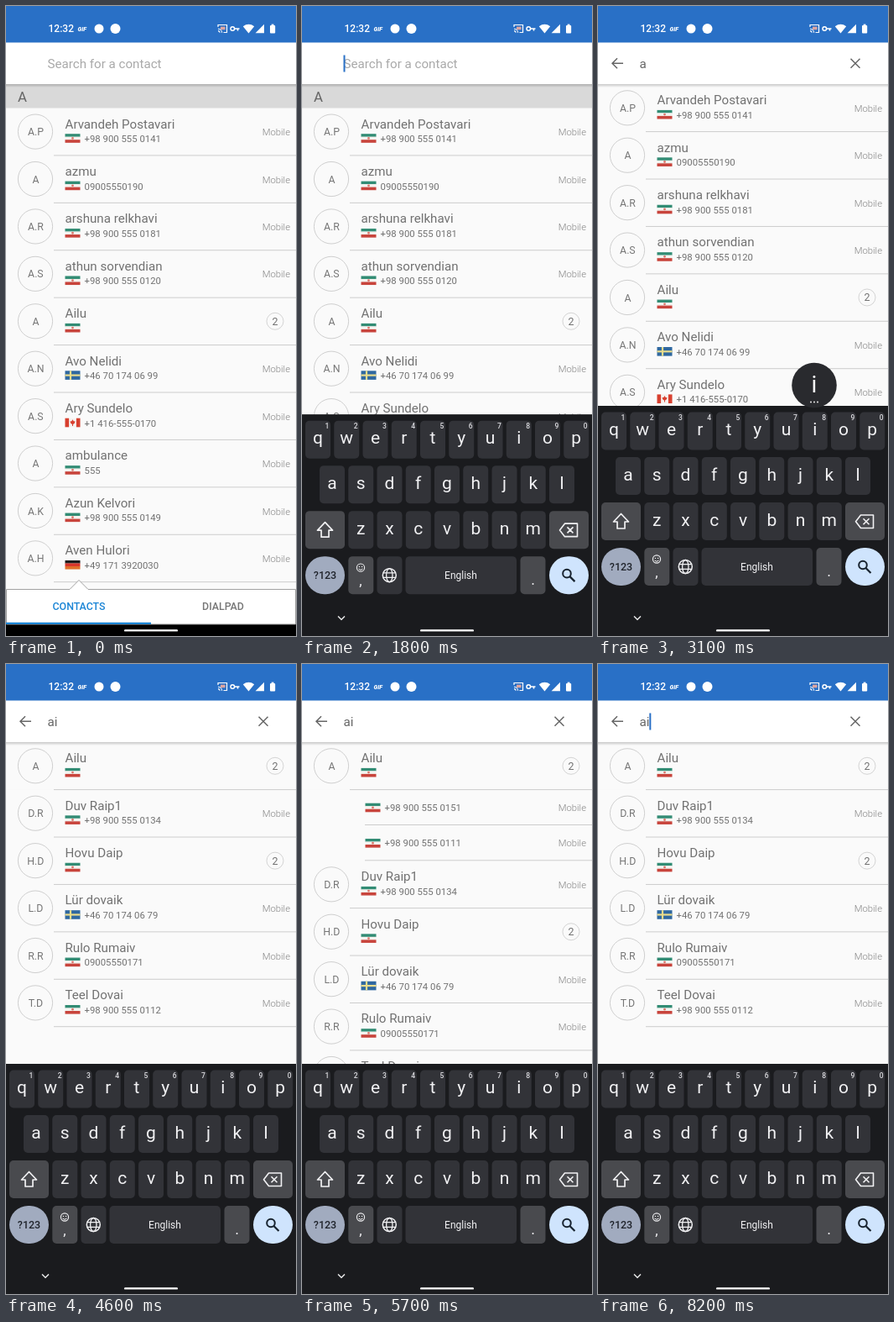
Recreate the animation shown at these times as an HTML page. Size 346 by 750 pixels, loop 8.6 s.

```html
<!DOCTYPE html>
<html lang="en">
<head>
<meta charset="utf-8">
<title>Contact search</title>
<style>
html, body { margin: 0; width: 100%; height: 100%; overflow: hidden; background: #fafafa; }
svg { display: block; font-family: Roboto, sans-serif; }
text { white-space: pre; }
</style>
</head>
<body>
<svg id="stage" width="346" height="750" viewBox="0 0 346 750"></svg>
<script>
const LOOP = 8600, STEP = 100, PITCH = 56.42, SUB = 42.3;
const GREY = '#717171', LINE = '#cdcdcd', PAGE = '#fafafa', BLUE = '#2970c6';

const contacts = [
  ['Arvandeh Postavari', 'A.P', 'ir', '+98 900 555 0141'],
  ['azmu', 'A', 'ir', '09005550190'],
  ['arshuna relkhavi', 'A.R', 'ir', '+98 900 555 0181'],
  ['athun sorvendian', 'A.S', 'ir', '+98 900 555 0120'],
  ['Ailu', 'A', 'ir', ''],
  ['Avo Nelidi', 'A.N', 'se', '+46 70 174 06 99'],
  ['Ary Sundelo', 'A.S', 'ca', '+1 416-555-0170'],
  ['ambulance', 'A', 'ir', '555'],
  ['Azun Kelvori', 'A.K', 'ir', '+98 900 555 0149'],
  ['Aven Hulori', 'A.H', 'de', '+49 171 3920030']
];
const matches = [
  ['Duv Raip1', 'D.R', 'ir', '+98 900 555 0134'],
  ['Hovu Daip', 'H.D', 'ir', ''],
  ['Lür dovaik', 'L.D', 'se', '+46 70 174 06 79'],
  ['Rulo Rumaiv', 'R.R', 'ir', '09005550171'],
  ['Teel Dovai', 'T.D', 'ir', '+98 900 555 0112']
];
const extraNumbers = ['+98 900 555 0151', '+98 900 555 0111'];

const rect = (x, y, w, h, fill, more = '') =>
  `<rect x="${x}" y="${y}" width="${w}" height="${h}" fill="${fill}" ${more}/>`;
const text = (x, y, s, size, fill, more = '') =>
  `<text x="${x}" y="${y}" font-size="${size}" fill="${fill}" ${more}>${s}</text>`;
const mid = (x, y, s, size, fill, more = '') => text(x, y, s, size, fill, 'text-anchor="middle" ' + more);
const ring = (x, y, r, stroke, more = '') =>
  `<circle cx="${x}" cy="${y}" r="${r}" fill="none" stroke="${stroke}" ${more}/>`;
const dot = (x, y, r, fill) => `<circle cx="${x}" cy="${y}" r="${r}" fill="${fill}"/>`;
const stroke = (d, color, w = 1.5, more = '') =>
  `<path d="${d}" fill="none" stroke="${color}" stroke-width="${w}" ${more}/>`;
const fill = (d, color) => `<path d="${d}" fill="${color}"/>`;
const group = (id, body) => `<g id="${id}">${body}</g>`;

const bands = (x, y, colors) => colors.map((c, i) => rect(x, y + i * 3.5, 18, 3.6, c)).join('');
const flags = {
  ir: (x, y) => bands(x, y, ['#328c74', '#f4f4f0', '#c8443c']) + dot(x + 9, y + 5.2, 1.4, '#d9776c'),
  de: (x, y) => bands(x, y, ['#1c1c1c', '#d8362c', '#e0702a']),
  se: (x, y) => rect(x, y, 18, 10.6, '#2f68a0') + rect(x + 5.4, y, 2.2, 10.6, '#e9dc8c') +
    rect(x, y + 4.2, 18, 2.2, '#e9dc8c'),
  ca: (x, y) => rect(x, y, 18, 10.6, '#f6f2f0') + rect(x, y, 4.6, 10.6, '#d8402f') +
    rect(x + 13.4, y, 4.6, 10.6, '#d8402f') +
    fill(`M${x + 9} ${y + 1.5}l1.2 2 1.9.3-1 2.4-1.6 1v2h-1v-2l-1.6-1-1-2.4 1.9-.3z`, '#d8402f')
};

function row([name, initials, flag, number], c) {
  const right = number
    ? text(339, c + 4.6, 'Mobile', 11.3, '#858585', 'text-anchor="end" font-weight="300"')
    : ring(321, c, 10, '#d4d4d4') + mid(321, c + 4.5, '2', 12.5, GREY);
  return ring(35, c, 20.6, '#cfcfcf') + mid(35.4, c + 4.6, initials, 12.3, '#777') +
    text(70.5, c - 4.1, name, 15.15, GREY) + flags[flag](70.5, c + 2.6) +
    text(93.5, c + 12.5, number, 11.35, GREY) + right +
    rect(57, c + 27.8, 289, 1, LINE);
}
const rows = (list, top) => list.map((r, i) => row(r, top + i * PITCH)).join('');

function subRows() {
  return rect(57, 150, 289, 84, PAGE) + extraNumbers.map((n, i) => {
    const c = 171 + i * SUB;
    return flags.ir(75.5, c - 5.3) + text(98.5, c + 4.1, n, 11.35, GREY) +
      text(339, c + 4.1, 'Mobile', 11.3, '#858585', 'text-anchor="end" font-weight="300"') +
      rect(75, c + 20, 271, 1, LINE);
  }).join('');
}

function statusBar() {
  const w = '#fff';
  return rect(0, 0, 346, 43.5, BLUE) +
    text(50.5, 31, '12:32', 12, w, 'font-weight="500"') +
    text(85.5, 29.6, 'GIF', 7, w, 'font-weight="900" font-style="italic"') +
    dot(111, 27, 5.5, w) + dot(130.5, 27, 6, w) +
    stroke('M253 25v-2.5h10.5v9h-4', w, 1.2) +
    stroke('M253 27.2a4.6 4.6 0 0 1 4.6 4.6M253 29.6a2.2 2.2 0 0 1 2.2 2.2', w, 1.1) +
    rect(256, 24.6, 5.5, 3.6, '#dca4a0') +
    ring(270.3, 27, 2.3, w, 'stroke-width="1.5"') + stroke('M272.5 27h6M276.5 27v2.6', w, 1.6) +
    fill('M282.8 24.2q6.7-4.8 13.4 0l-6.7 8.2z', w) + fill('M308 21.8v10.4h-10.4z', w) +
    rect(315, 23, 6.2, 9.6, w, 'rx="1"') + rect(316.7, 21.6, 2.8, 2, w);
}

function searchBar() {
  return rect(0, 93, 346, 4, 'url(#shade)') + rect(0, 43, 346, 50, '#fff') +
    text(49.5, 74, 'Search for a contact', 15.15, '#a9a9a9', 'id="hint"') +
    text(49.5, 74, '', 15.15, '#666', 'id="query"') +
    group('icons', stroke('M30 68.3H17.5M23 62.3l-6 6 6 6', '#666') +
      stroke('M301.5 62.8l11 11M312.5 62.8l-11 11', '#666')) +
    rect(49.5, 58.5, 2, 20, BLUE, 'id="caret"');
}

function tabs() {
  const accent = '#1d86d6';
  return rect(0, 736, 346, 14, '#000') +
    `<path d="M.5 694.5H76L87 683.5 98 694.500H345.500V736H.5z" fill="#fff" stroke="#a2a2a2"/>` +
    mid(87, 719.4, 'CONTACTS', 12.4, accent, 'font-weight="500"') +
    mid(259, 719.4, 'DIALPAD', 12.4, '#777', 'font-weight="500"') +
    rect(0, 733.8, 173, 2.2, accent);
}

const KEY = 34.25, KEY_BG = '#323338', SIDE_BG = '#494a4e', INK = '#f1f1f3';
const key = (x, y, w, bg, r = 5) => rect(x, y, w, 45, bg, `rx="${r}"`);

function letters(str, x, y) {
  return [...str].map((ch, i) =>
    key(x + i * KEY, y, 30, KEY_BG) + mid(x + i * KEY + 15, y + 27.5, ch, 21, INK)).join('');
}

function keyboard() {
  const digits = [...'1234567890'].map((d, i) =>
    mid(30 + i * KEY, 493, d, 8.5, '#dcdce0', 'font-weight="500"')).join('');
  return rect(0, 476, 346, 300, '#1a1b1e') +
    letters('qwertyuiop', 4, 483.5) + digits +
    letters('asdfghjkl', 21, 537) + letters('zxcvbnm', 55.3, 591) +
    key(4, 591, 47, SIDE_BG) + key(295, 591, 47, SIDE_BG) +
    stroke('M27.5 604.5l9 9.5h-4.5v8h-9v-8h-4.5z', INK, 1.7, 'stroke-linejoin="round"') +
    stroke('M313.5 606h15v15.500h-15l-6-7.750zM316.5 610.2l7 7M323.5 610.2l-7 7', INK, 1.6,
      'stroke-linejoin="round"') +
    key(4, 645, 47, '#a1abbf', 22.5) + mid(27.5, 672, '?123', 12.5, '#20242c', 'font-weight="500"') +
    key(55.3, 645, 30, SIDE_BG) + ring(70, 658.5, 4.6, INK, 'stroke-width="1.1"') +
    dot(68.4, 657.4, .7, INK) + dot(71.6, 657.4, .7, INK) +
    stroke('M67.5 660q2.5 2.6 5 0', INK, 1) + mid(70, 680, ',', 17, INK) +
    key(89.5, 645, 30, KEY_BG) + ring(104.3, 667.5, 8, INK, 'stroke-width="1.5"') +
    `<ellipse cx="104.3" cy="667.5" rx="3.7" ry="8" fill="none" stroke="${INK}" stroke-width="1.3"/>` +
    stroke('M97 664.7h14.6M97 670.3h14.6', INK, 1.3) +
    key(123.5, 645, 132.5, KEY_BG) + mid(189.5, 671.5, 'English', 12, INK) +
    key(260.5, 645, 30, SIDE_BG) + mid(275.5, 679, '.', 18, INK) +
    key(295, 645, 47, '#cfe4fd', 22.5) + ring(316, 665.5, 4.8, '#17222e', 'stroke-width="2"') +
    stroke('M319.5 669l6 6', '#17222e', 2.2);
}

const popup = dot(0, 0, 26.8, '#292a2e') + mid(0, 8, '', 28, '#fff', 'id="popChar"') +
  [-4, 0, 4].map(x => dot(x, 20, .9, '#fff')).join('');

const defs = `<defs>
<linearGradient id="shade" x2="0" y2="1"><stop stop-color="#000" stop-opacity=".2"/><stop offset="1" stop-opacity="0"/></linearGradient>
<radialGradient id="glow" gradientUnits="userSpaceOnUse" cx="152" cy="121" r="150">
<stop offset=".52" stop-color="#a8dcf3"/><stop offset="1" stop-color="#a8dcf3" stop-opacity="0"/></radialGradient></defs>`;

document.getElementById('stage').innerHTML = defs + rect(0, 0, 346, 750, PAGE) +
  group('all', rows(contacts, 149.6)) +
  group('header', rect(0, 93, 346, 28.5, '#d9d9d9') + text(14, 114, 'A', 16.8, '#666')) +
  group('found', group('rest', rows(matches, 121.3 + PITCH)) + group('sub', subRows()) +
    rect(0, 93, 346, 56.5, PAGE) + rect(0, 93, 346, 56.5, 'url(#glow)', 'id="ripple"') +
    row(contacts[4], 121.3)) +
  searchBar() + statusBar() + tabs() +
  group('keys', keyboard()) + group('popup', popup) +
  group('chevron', stroke('M43 726.5l4 4 4-4', '#e8e8e8', 1.5)) +
  rect(141, 742.2, 64, 2.4, '#fff', 'rx="1.2"');

const el = id => document.getElementById(id);
const [all, header, found, rest, sub, ripple, glow, hint, query, icons, caret, keys, popupEl, popChar, chevron] =
  ['all', 'header', 'found', 'rest', 'sub', 'ripple', 'glow', 'hint', 'query', 'icons', 'caret',
    'keys', 'popup', 'popChar', 'chevron'].map(el);

const show = (node, on) => node.setAttribute('visibility', on ? 'visible' : 'hidden');
const move = (node, x, y) => node.setAttribute('transform', `translate(${x} ${y})`);
const clamp = v => Math.min(1, Math.max(0, v));
const ease = v => .5 - .5 * Math.cos(Math.PI * clamp(v));

const FOCUS = 1600, TYPE_A = 2600, TYPE_I = 3200, BLINK = 505;
const presses = [[2500, 'a', 36, 505], [3100, 'i', 258, 451.5]];
const taps = [5400, 6800];

function draw(t) {
  const typed = t >= TYPE_I ? 'ai' : t >= TYPE_A ? 'a' : '';
  const shifted = t >= TYPE_A + 100;
  const searching = t >= TYPE_I;

  show(all, !searching);
  show(found, searching);
  show(header, !shifted);
  move(all, 0, shifted ? -28.3 : 0);

  query.textContent = typed;
  show(hint, !typed);
  show(icons, typed);

  // Typing the second letter restarts the caret's blink.
  const blinkFrom = searching ? 3060 : 1585;
  show(caret, t >= FOCUS && Math.floor((t - blinkFrom) / BLINK) % 2 === 0);
  move(caret, [0, 8.2, 11.8][typed.length], 0);

  show(keys, t >= FOCUS);
  show(chevron, t >= FOCUS + 100);
  move(keys, 0, 274 * (1 - clamp((t - 1520) / 420)) ** 3);

  const press = presses.find(([at]) => t >= at && t < at + 100);
  show(popupEl, press);
  show(popChar, press);
  if (press) {
    popChar.textContent = press[1];
    move(popupEl, press[2], press[3]);
  }

  const open = ease((t - 5430) / 250) - ease((t - 6933) / 250);
  move(rest, 0, 2 * SUB * open);
  sub.setAttribute('opacity', open);

  const tap = taps.find(at => t >= at && t < at + 300);
  show(ripple, searching && tap);
  if (tap) glow.setAttribute('r', 70 + (t - tap) * .4);
}

const start = performance.now();
function tick() {
  const t = (performance.now() - start) % LOOP;
  draw(Math.floor(t / STEP) * STEP);
  requestAnimationFrame(tick);
}
tick();
</script>
</body>
</html>
```
